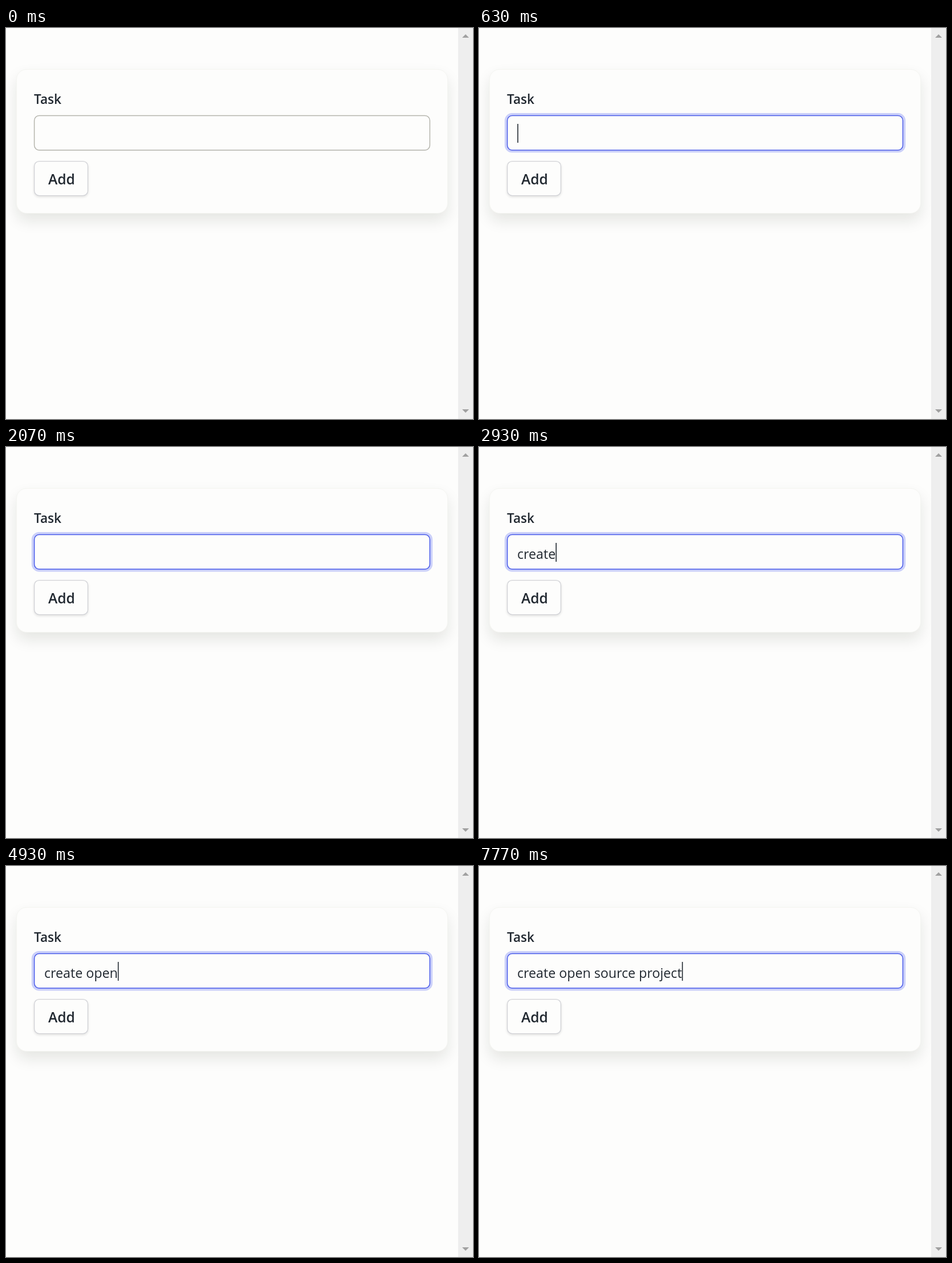
An HTML page that plays this animation: 818x685 px, repeating every 8000 ms.

```html
<!DOCTYPE html>
<html lang="en">
<head>
<meta charset="utf-8">
<title>Task form</title>
<style>
  html, body { margin: 0; width: 100%; height: 100%; overflow: hidden; background: #fdfdfc; }
  div, svg { position: absolute; box-sizing: border-box; }
  #card { left: 18px; top: 72px; width: 755.5px; height: 253px; border-radius: 18px;
    border: 1px solid #f4f5f1; background: #fdfdfc; box-shadow: 0 12.8px 25.6px rgba(20, 28, 10, .1); }
  #button { left: 49px; top: 233px; width: 95px; height: 61px; border-radius: 9px;
    background: #fdfdfc; box-shadow: 0 2px 4px rgba(0, 0, 0, .12); }
  #bar { left: 792px; top: 0; width: 26px; height: 685px; background: #eeeeee; }
  svg { left: 0; top: 0; }
  text { font-family: "Open Sans", "Noto Sans", sans-serif; font-weight: 600; fill: #212830; white-space: pre; }
  #typed { font-size: 23.2px; font-weight: 400; }
</style>
</head>
<body>
<div id="card"></div>
<div id="button"></div>
<div id="bar"></div>
<svg width="818" height="685">
  <rect id="ring" x="47" y="151.2" width="698" height="65" rx="11" fill="none" stroke="#cbd0f9"/>
  <rect id="field" x="49.6" y="153.6" width="692.8" height="60.4" rx="8.5" fill="#fdfdfc" stroke-width="1.5"/>
  <rect x="49.6" y="233.6" width="93.8" height="60" rx="8.5" fill="none" stroke="#d2d3d7" stroke-width="1.4"/>
  <text x="49" y="133" font-size="22.6">Task</text>
  <text x="74" y="274" font-size="24.5">Add</text>
  <text id="typed" x="67" y="195.6"></text>
  <rect id="caret" y="168" width="1.6" height="33" fill="#212830"/>
  <path d="M799 17l6-6 6 6zM799 668h12l-6 6z" fill="#a0a0a0"/>
</svg>
<script>
const LOOP = 8000, FOCUS = 470, FADE = 200, CARET = 500, BLINK = 520;
// Each burst types its text evenly between its first and last key press
const bursts = [
  { text: "create", from: 2170, to: 2930 },
  { text: " open", from: 4100, to: 4930 },
  { text: " source", from: 5570, to: 6500 },
  { text: " project", from: 6600, to: 7770 },
];
const keys = bursts.flatMap(({ text, from, to }) =>
  [...text].map((char, i) => ({ char, time: from + (to - from) * i / (text.length - 1) })));

const [ring, field, typed, caret] =
  ["ring", "field", "typed", "caret"].map(id => document.getElementById(id));
const mix = (a, b, p) => a + (b - a) * p;

function draw(t) {
  const p = Math.min(1, Math.max(0, (t - FOCUS) / FADE));
  const focus = 1 - (1 - p) ** 2;
  field.setAttribute("stroke", `rgb(${mix(180, 70, focus)}, ${mix(180, 88, focus)}, ${mix(172, 234, focus)})`);
  ring.setAttribute("stroke-width", 4.4 * focus);

  const pressed = keys.filter(key => key.time <= t);
  typed.textContent = pressed.map(key => key.char).join("");
  caret.setAttribute("x", 67.2 + typed.getComputedTextLength());

  // Every key press restarts the blink
  const last = pressed.at(-1)?.time ?? CARET;
  const shown = t >= CARET && Math.floor((t - last) / BLINK) % 2 === 0;
  caret.style.visibility = shown ? "visible" : "hidden";
}

const start = performance.now();
function tick() {
  draw((performance.now() - start) % LOOP);
  requestAnimationFrame(tick);
}
tick();
</script>
</body>
</html>
```
